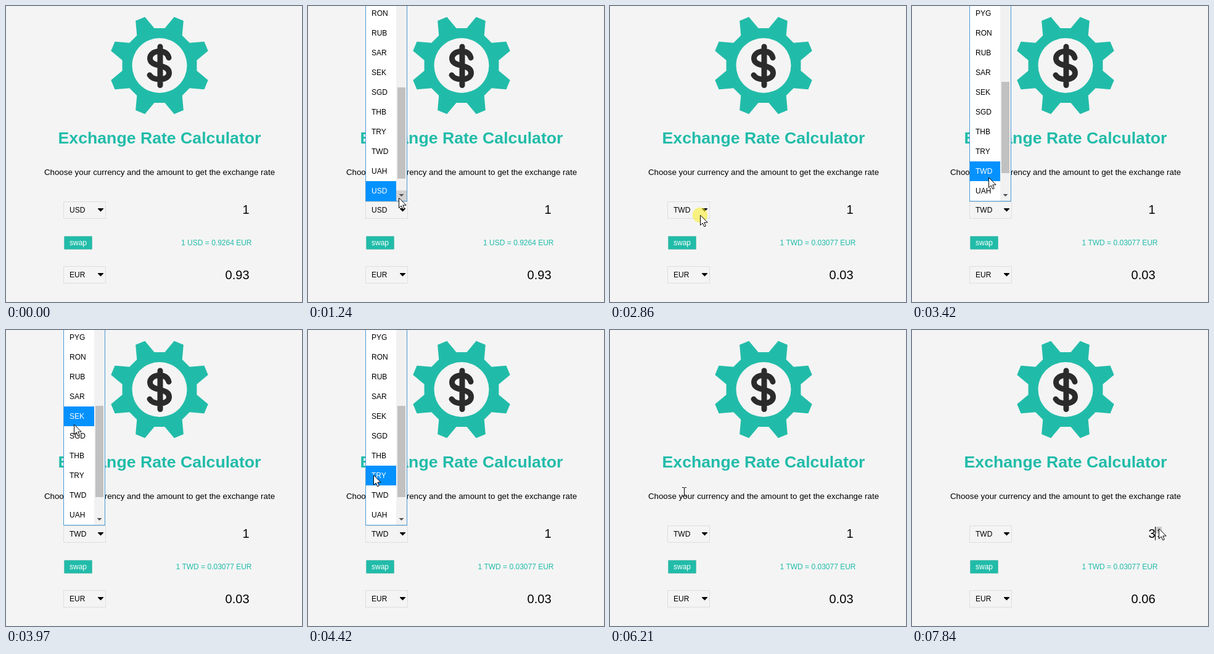
An HTML page with a canvas for the animation above (7990 ms loop, 480 by 480 pixels).

```html
<!DOCTYPE html>
<html lang="en">
<head>
<meta charset="utf-8">
<title>Exchange Rate Calculator</title>
<style>
  html, body { margin: 0; overflow: hidden; background: #f4f4f4; }
  canvas { display: block; }
</style>
</head>
<body>
<canvas id="stage" width="480" height="480"></canvas>
<script>
const ctx = document.getElementById('stage').getContext('2d');
const LOOP = 7990, PRESS = 80, FETCH = 330;
const TEAL = '#21bca9', INK = '#2b2b2b', BACK = '#f4f4f4';
const ROW = 32, LIST_BOTTOM = 316;
const codes = 'PLN PYG RON RUB SAR SEK SGD THB TRY TWD UAH USD'.split(' ');

// Each click takes effect when the press ends: open, choose, open, choose, step up
const clicks = [850, 2150, 2860, 5430, 7760];

// The pointer rests between moves
const firstSeen = 140, startPoint = { x: 391, y: 330 };
const moves = [
  { from: 140, to: 460, x: 220, y: 352 },
  { from: 460, to: 700, x: 150, y: 329 },
  { from: 1170, to: 1240, x: 147, y: 311 },
  { from: 1240, to: 1620, x: 99, y: 236 },
  { from: 1930, to: 2000, x: 114, y: 225 },
  { from: 2410, to: 2690, x: 146, y: 339 },
  { from: 3020, to: 3420, x: 124, y: 278 },
  { from: 3420, to: 4030, x: 108, y: 140 },
  { from: 4030, to: 4420, x: 106, y: 235 },
  { from: 4420, to: 4660, x: 118, y: 290 },
  { from: 4820, to: 5200, x: 118, y: 277 },
  { from: 5510, to: 5840, x: 391, y: 328 },
  { from: 5840, to: 6210, x: 120, y: 262 },
  { from: 6290, to: 6800, x: 270, y: 375 },
  { from: 6800, to: 7140, x: 407, y: 327 },
  { from: 7310, to: 7530, x: 400, y: 322 }
];

function pointerAt(t) {
  let { x, y } = startPoint;
  for (const move of moves) {
    if (t < move.from) break;
    const k = Math.min(1, (t - move.from) / (move.to - move.from));
    x += (move.x - x) * k;
    y += (move.y - y) * k;
  }
  return { x: Math.round(x), y: Math.round(y) };
}

function text(str, x, y, size, color = '#000', align = 'left', weight = '') {
  ctx.font = `${weight} ${size}px "Liberation Sans", Arial, sans-serif`;
  ctx.textAlign = align;
  ctx.fillStyle = color;
  ctx.fillText(str, x, y);
}

function rect(x, y, w, h, color) {
  ctx.fillStyle = color;
  ctx.fillRect(x, y, w, h);
}

function frameRect(x, y, w, h, color) {
  ctx.strokeStyle = color;
  ctx.lineWidth = 1;
  ctx.strokeRect(x + .5, y + .5, w - 1, h - 1);
}

function disc(x, y, r, color) {
  ctx.fillStyle = color;
  ctx.beginPath();
  ctx.arc(x, y, r, 0, 2 * Math.PI);
  ctx.fill();
}

function polygon(points, color) {
  ctx.beginPath();
  points.forEach(([x, y]) => ctx.lineTo(x, y));
  ctx.closePath();
  ctx.fillStyle = color;
  ctx.fill();
}

// Small triangle whose tip is dy below (or above) its base
const triangle = (x, y, half, dy, color) =>
  polygon([[x - half, y], [x + half, y], [x, y + dy]], color);

const dollar = new Path2D('M264 84C262 76 256 73.5 249 73.5C239 73.5 233.5 79 233.5 85' +
  'C233.5 92 240 94.5 249 96.5C259 99 264.5 102 264.5 108.5C264.5 115 258 119 249 119' +
  'C242 119 236 117 233 112M250 66V128.5');

function drawGear() {
  const points = [];
  for (let tooth = 0; tooth < 8; tooth++) {
    for (const [offset, r] of [[-14.5, 61], [-5.7, 82.2], [5.7, 82.2], [14.5, 61]]) {
      const a = (22.5 + tooth * 45 + offset) * Math.PI / 180;
      points.push([249 + r * Math.sin(a), 96.5 - r * Math.cos(a)]);
    }
  }
  polygon(points, TEAL);
  disc(249, 96.5, 44.5, BACK);
  ctx.strokeStyle = INK;
  ctx.lineWidth = 9;
  ctx.lineCap = 'round';
  ctx.stroke(dollar);
}

function drawSelect(y, code) {
  frameRect(93, y, 69, 28, '#dedede');
  text(code, 103, y + 18, 12);
  rect(149, y + 11, 9, 1, '#000');
  triangle(153.5, y + 12, 4.5, 4.5, '#000');
}

function drawSwap() {
  ctx.beginPath();
  ctx.roundRect(94, 373, 46, 22, 2);
  ctx.fillStyle = TEAL;
  ctx.fill();
  ctx.beginPath();
  ctx.roundRect(94.5, 373.5, 45, 21, 2);
  ctx.strokeStyle = '#6cc3b7';
  ctx.lineWidth = 1;
  ctx.stroke();
  text('swap', 117, 388, 12, '#fff', 'center');
}

function drawList(selected, scroll, p) {
  const onRows = p.x >= 94 && p.x < 143 && p.y < LIST_BOTTOM;
  const onButton = p.x >= 143 && p.x < 160 && p.y >= 299 && p.y < LIST_BOTTOM;
  ctx.save();
  ctx.beginPath();
  ctx.rect(94, 0, 66, LIST_BOTTOM);
  ctx.clip();
  rect(94, 0, 66, LIST_BOTTOM, '#fff');
  codes.forEach((code, i) => {
    const y = LIST_BOTTOM - (codes.length - i - scroll) * ROW;
    const active = onRows ? p.y >= y && p.y < y + ROW : code === selected;
    if (active) rect(94, y, 49, ROW, '#0592ff');
    text(code, 103, y + 20, 12, active ? '#fff' : '#000');
  });
  rect(143, 0, 17, LIST_BOTTOM, '#f1f1f1');
  rect(145, 132 - 9 * scroll, 13, 148, '#c1c1c1');
  if (onButton) rect(143, 299, 17, 17, '#d2d2d2');
  triangle(151.5, 305, 4, 4, '#505050');
  ctx.restore();
  frameRect(93, -2, 68, LIST_BOTTOM + 3, '#4a9ad6');
}

function drawSpinner() {
  rect(395, 319, 10, 11, '#c9c9c9');
  rect(395, 330, 10, 11, '#ececec');
  triangle(400, 326, 2.5, -3, '#606060');
  triangle(400, 334, 2.5, 3, '#606060');
}

function drawArrow({ x, y }) {
  polygon([[0, 0], [0, 16], [3.7, 12.5], [6.3, 18.3], [8.8, 17.2], [6.3, 11.5], [11.3, 11.5]]
    .map(([dx, dy]) => [x + dx + .5, y + dy + .5]), '#fff');
  ctx.strokeStyle = '#000';
  ctx.lineWidth = 1;
  ctx.stroke();
}

function drawBeam({ x, y }) {
  rect(x, y - 6, 1, 13, '#000');
  for (const dy of [-7, 7]) {
    rect(x - 3, y + dy, 3, 1, '#000');
    rect(x + 1, y + dy, 3, 1, '#000');
  }
}

function draw(t) {
  const done = clicks.filter(click => t >= click + PRESS).length;
  const pressing = t >= clicks[done];
  const open = done === 1 || done === 3;
  const code = done < 2 ? 'USD' : 'TWD';
  const fetched = t > clicks[1] + PRESS + FETCH;
  const amount = done === 5 ? 3 : done === 4 && pressing ? 2 : 1;
  const converted = done === 5 ? '0.06' : fetched ? '0.03' : '0.93';

  rect(0, 0, 480, 480, BACK);
  drawGear();
  text('Exchange Rate Calculator', 249, 223, 26.67, TEAL, 'center', 'bold');
  text('Choose your currency and the amount to get the exchange rate', 249, 274, 13.33, '#000', 'center');
  drawSelect(317, code);
  drawSelect(422, 'EUR');
  drawSwap();
  text(amount, 394.5, 337, 20, '#000', 'right');
  text(fetched ? '1 TWD = 0.03077 EUR' : '1 USD = 0.9264 EUR', 398.5, 388, 12, TEAL, 'right');
  text(converted, 394.5, 443, 20, '#000', 'right');
  if (t < firstSeen) return;

  const p = pointerAt(t);
  const onInput = !open && p.x > 320 && p.x < 405 && p.y > 316 && p.y < 344;
  const onText = !open && p.y >= 262 && p.y < 277;
  // The list opens with the choice in its last row, then scrolls up by one
  if (open) drawList(code, done === 1 ? 0 : t < 3250 ? 2 : 1, p);
  if (onInput) drawSpinner();
  if (t >= clicks[4]) rect(394, 319, 1, 22, '#000');
  if (pressing) disc(p.x, p.y, 12.3, 'rgba(250,238,50,.6)');
  if (onText || onInput && p.x < 395) drawBeam(p);
  else drawArrow(p);
}

function frame() {
  draw(performance.now() % LOOP);
  requestAnimationFrame(frame);
}
frame();
</script>
</body>
</html>
```
